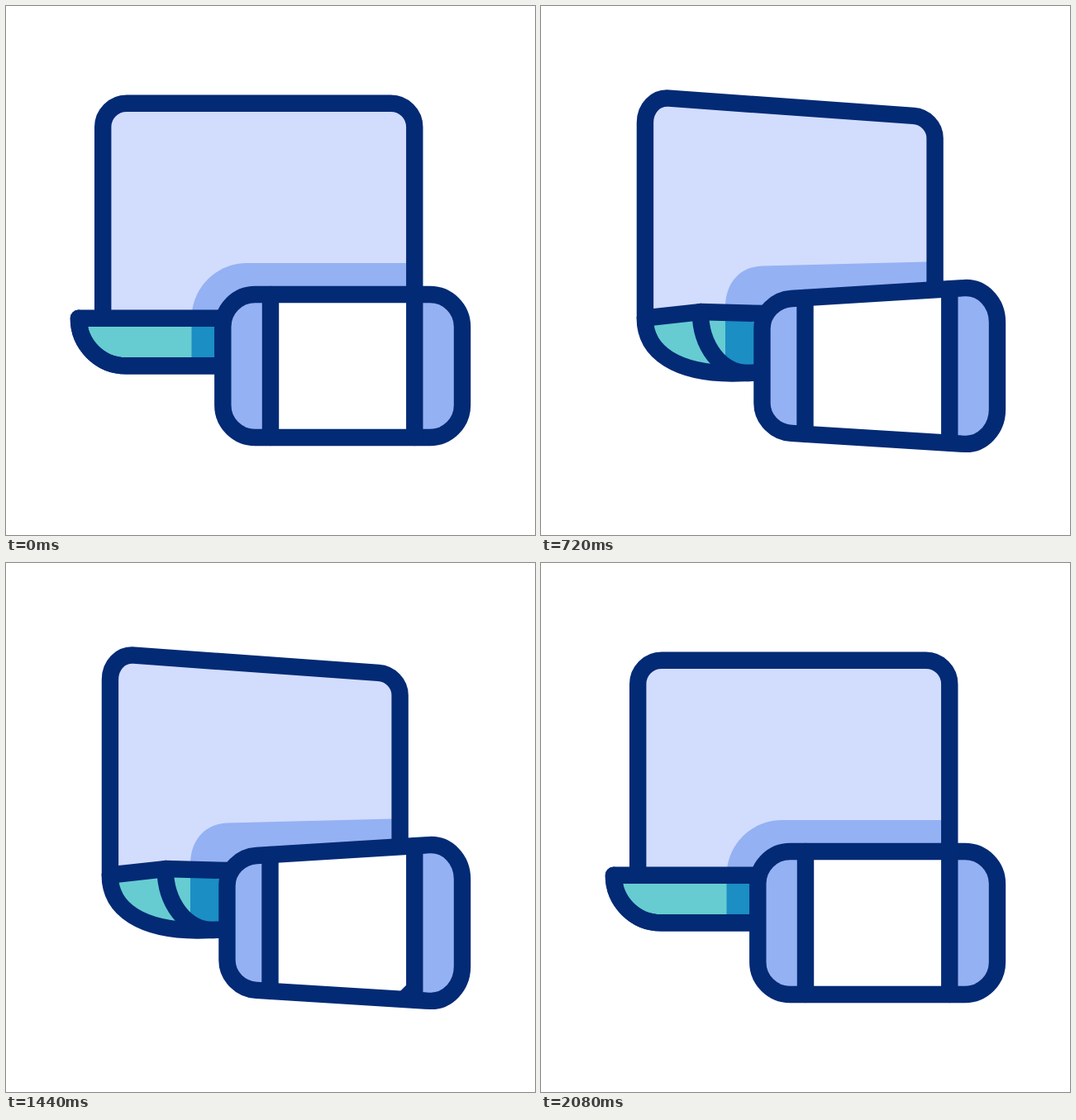
These frames come from a looping animation (640x640 px, 2.56 s). An HTML page:

```html
<!DOCTYPE html>
<html lang="en">
<head>
<meta charset="utf-8">
<title>Laptop and console</title>
<style>
  html, body { margin: 0; width: 100%; height: 100%; overflow: hidden; background: #fff; }
  svg { display: block; width: 100vw; height: 100vh; }
  .line { fill: none; stroke: #032a75; stroke-width: 20.4; stroke-linecap: round; stroke-linejoin: round; }
</style>
</head>
<body>
<svg viewBox="0 0 640 640">
  <clipPath id="screenClip"><path data-shape="screen"/></clipPath>
  <clipPath id="panelClip"><path data-shape="panel"/></clipPath>

  <path data-shape="screen" fill="#d2dcfd"/>
  <path data-shape="screenShade" fill="#94b1f3"/>
  <g clip-path="url(#screenClip)"><path id="screenSweep" class="line"/></g>
  <path data-shape="screen" class="line"/>

  <path data-shape="base" fill="#66ccd1"/>
  <path data-shape="baseShade" fill="#1b8ec4"/>
  <path data-shape="base" class="line"/>
  <path data-shape="baseFront" class="line"/>

  <path data-shape="console" fill="#94b1f3"/>
  <path data-shape="panel" fill="#fff"/>
  <g clip-path="url(#panelClip)"><path id="panelSweep" class="line"/></g>
  <path data-shape="console" class="line"/>
  <path data-shape="bars" class="line"/>
</svg>
<script>
const LOOP = 2560, STEP = 40;

// Each shape: [facing forward, turned sideways]
const shapes = {
  screen: [
    'M117.2 378L117.2 146.5C117.2 130.6 130.1 117.7 146 117.7L465.5 117.7C481.4 117.7 494.3 130.6 494.3 146.5L494.3 378',
    'M126 377.5L126 141C126 123.5 138.5 110.3 155 111.6L450.5 133C465 134 476.5 146 476.5 160L476.5 372'],
  screenShade: [
    'M224.5 378C224.5 341 254.5 311 291.5 311L494.3 311L494.3 378Z',
    'M223 364C223 336 240 315.2 268 314.4L476.5 309.2L476.5 372Z'],
  base: [
    'M270 377.8L87.9 377.8L87.9 377.8C87.9 409.5 113.5 435.3 145.3 435.3L270 435.3',
    'M270 372L193.5 370L126 377.5C126 420 166 444.5 232 444.5L270 443.6'],
  baseFront: [
    'M87.9 377.8C87.9 409.5 113.5 435.3 145.3 435.3L270 435.3',
    'M193.5 370C193.5 412 219 444 251 444L270 443.6'],
  baseShade: [
    'M224.5 378L270 378L270 436L224.5 436Z',
    'M223 371L270 372L270 443L223 443Z'],
  console: [
    'M262.3 388L262.3 483C262.3 504.5 279.8 522 301.3 522L513 522C534.5 522 552 504.5 552 483L552 388C552 366.5 534.5 349 513 349L301.3 349C279.8 349 262.3 366.5 262.3 388Z',
    'M267.5 390.5L267.5 480.5C267.5 500 283.5 515.7 303 516.9L512 529.9C534 531.2 552 512 552 488L552 382.5C552 358.5 534 339.7 512 341.1L303 354C283.5 355.2 267.5 371 267.5 390.5Z'],
  panel: [
    'M320 349L494.3 349L494.3 522L320 522Z',
    'M319.5 353L494.3 342.2L494.3 528.8L319.5 517.9Z'],
  bars: [
    'M320 349L320 522M494.3 349L494.3 522',
    'M319.5 353L319.5 517.9M494.3 342.2L494.3 528.8']
};

const parts = [...document.querySelectorAll('[data-shape]')];
const screenSweep = document.getElementById('screenSweep');
const panelSweep = document.getElementById('panelSweep');

const lerp = (a, b, k) => a + (b - a) * k;
const progress = (t, start, length) => Math.min(1, Math.max(0, (t - start) / length));
const quart = k => k < 0.5 ? 8 * k ** 4 : 1 - 8 * (1 - k) ** 4;
const smooth = k => k * k * (3 - 2 * k);

function morph([from, to], k) {
  const goal = to.match(/[\d.]+/g);
  let i = 0;
  return from.replace(/[\d.]+/g, n => lerp(+n, +goal[i++], k).toFixed(3));
}

// Diagonal on which x + y equals sum
const diagonal = sum => `M${sum} 0L0 ${sum}`;

function draw(t) {
  const turn = quart(progress(t, 20, 840)) - quart(progress(t, 1295, 840));
  for (const part of parts) part.setAttribute('d', morph(shapes[part.dataset.shape], turn));
  screenSweep.setAttribute('d', diagonal(lerp(223, 839, smooth(progress(t, 640, 640)))));
  panelSweep.setAttribute('d', diagonal(lerp(650, 1040, smooth(progress(t, 910, 640)))));
}

const began = performance.now();
function tick() {
  const t = (performance.now() - began) % LOOP;
  draw(Math.floor(t / STEP) * STEP);
  requestAnimationFrame(tick);
}
tick();
</script>
</body>
</html>
```
